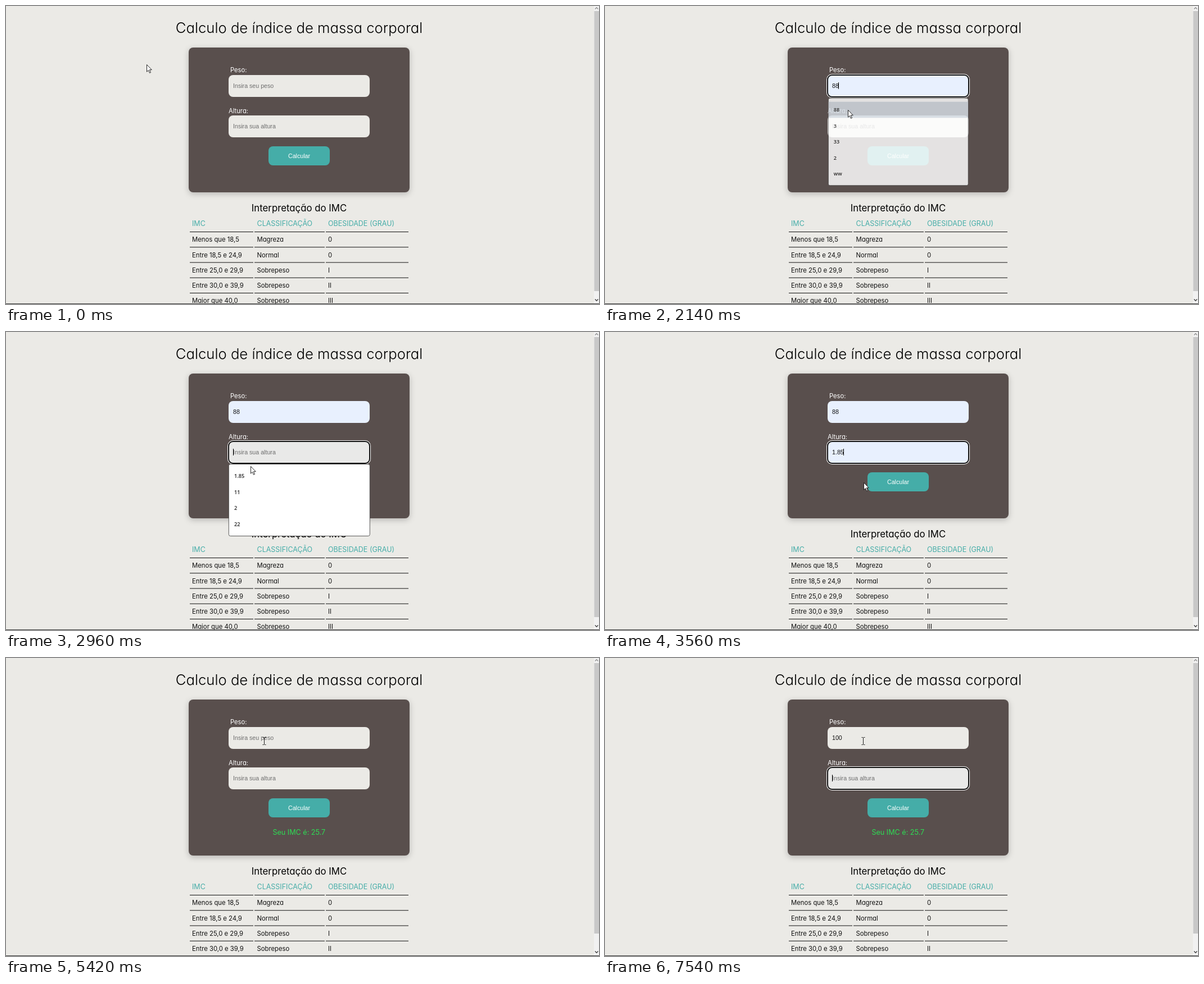
Recreate the animation shown at these times as an HTML page. Size 1055 px wide and 531 px high, loop 8000 ms.

```html
<!DOCTYPE html>
<html lang="pt">
<head>
<meta charset="utf-8">
<title>IMC</title>
<style>
html, body { margin: 0; width: 100%; height: 100%; overflow: hidden; background: #ebeae6; }
svg { display: block; font: 11.3px Inter, sans-serif; font-feature-settings: "cv11"; font-optical-sizing: none; }
.mid { text-anchor: middle; }
.title { font-size: 25.7px; font-weight: 350; }
.head { font-size: 12.5px; fill: #45ada8; }
.label { font-size: 11.2px; fill: #fff; }
.form { font: 10.67px "Liberation Sans", Arial, sans-serif; }
.option { font: 600 9.2px "Open Sans", sans-serif; fill: #222; }
.shadow { filter: drop-shadow(0 3px 5.5px rgba(0, 0, 0, .22)); }
</style>
</head>
<body>
<svg id="stage" width="1055" height="531" viewBox="0 0 1055 531"></svg>
<script>
const NS = 'http://www.w3.org/2000/svg';
const stage = document.getElementById('stage');
const LOOP = 8000, BLINK = 520, RESULT_AT = 4050;

function add(parent, tag, attrs = {}, content = '') {
  const node = document.createElementNS(NS, tag);
  set(node, attrs);
  node.textContent = content;
  return parent.appendChild(node);
}
function set(node, attrs) {
  for (const key in attrs) node.setAttribute(key, attrs[key]);
}
const show = (node, on) => node.setAttribute('visibility', on ? 'visible' : 'hidden');
const rect = (parent, x, y, width, height, fill, rx = 0) =>
  add(parent, 'rect', { x, y, width, height, fill, rx });
const text = (parent, x, y, content, attrs = {}) => add(parent, 'text', { x, y, ...attrs }, content);

rect(stage, 0, 0, 1055, 531, '#ebeae6');
text(stage, 521.5, 47.5, 'Calculo de índice de massa corporal', { class: 'mid title' });

const card = rect(stage, 325, 74, 393, 258, '#594f4d', 8);
card.setAttribute('class', 'shadow');
text(stage, 399, 118.3, 'Peso:', { class: 'label' });
text(stage, 396, 190.5, 'Altura:', { class: 'label' });

function makeField(y, hint) {
  const ring = add(stage, 'g');
  rect(ring, 394, y - 2, 255, 43, '#fff', 10);
  rect(ring, 395, y - 1, 253, 41, '#101010', 9);
  const box = rect(stage, 396, y, 251, 39, '#ebeae6', 8);
  const label = text(stage, 404, y + 23, hint, { class: 'form' });
  const caret = rect(stage, 404, y + 13, 1, 12, '#000');
  return { y, hint, ring, box, label, caret };
}
const weight = makeField(123, 'Insira seu peso');
const height = makeField(195, 'Insira sua altura');

rect(stage, 467, 250, 109, 34, '#45ada8', 8);
text(stage, 521.5, 271, 'Calcular', { class: 'form mid', fill: '#fff' });
const result = text(stage, 521.3, 314.5, 'Seu IMC é: 25.7', { class: 'mid', 'font-size': 12.6, fill: '#2edc54' });

const table = add(stage, 'g');
text(table, 521.5, 366, 'Interpretação do IMC', { class: 'mid', 'font-size': 16.8 });
const columns = [331, 446.5, 573];
['IMC', 'CLASSIFICAÇÃO', 'OBESIDADE (GRAU)'].forEach((s, i) => text(table, columns[i], 392.3, s, { class: 'head' }));
[
  ['Menos que 18,5', 'Magreza', '0'],
  ['Entre 18,5 e 24,9', 'Normal', '0'],
  ['Entre 25,0 e 29,9', 'Sobrepeso', 'I'],
  ['Entre 30,0 e 39,9', 'Sobrepeso', 'II'],
  ['Maior que 40,0', 'Sobrepeso', 'III']
].forEach((row, r) => {
  const y = 402 + r * 27.25;
  [[327, 440], [442, 567], [569, 716]].forEach(([a, b]) => rect(table, a, y, b - a, 1, '#111'));
  row.forEach((s, i) => text(table, columns[i], y + 18.4, s, { fill: '#111' }));
});

function makePanel(y, height, options) {
  const group = add(stage, 'g');
  set(rect(group, 396.3, y + .5, 251, height, '#fff', 3), { stroke: '#333', 'stroke-width': .8 });
  const highlight = rect(group, 396.7, y + 7, 250.2, 29, '#d5dce4');
  options.forEach((s, i) => text(group, 405.9, y + 24.7 + i * 28.8, s, { class: 'option' }));
  return { group, highlight, cy: y + height / 2 };
}
const weightPanel = makePanel(163, 157, ['88', '3', '33', '2', 'ww']);
const heightPanel = makePanel(235, 128, ['1.85', '11', '2', '22']);

// Window edge and scrollbar
rect(stage, 1046, 0, 9, 531, '#f1f1f1');
const thumb = rect(stage, 1046.5, 9, 8.5, 498, '#c8c8c8');
const chevron = { fill: 'none', 'stroke-width': 1.4 };
add(stage, 'path', { d: 'M1048 5.5l2.7-2.7 2.7 2.7', stroke: '#909090', ...chevron });
add(stage, 'path', { d: 'M1048 522.5l2.7 2.7 2.7-2.7', stroke: '#404040', ...chevron });
rect(stage, 0, 530, 1055, 1, '#3a3a3a');

const arrow = add(stage, 'path', {
  d: 'M.5 .5V13.2L3.4 10.5 5.5 15.3 7.5 14.4 5.4 9.7H9.3Z', fill: '#fff', stroke: '#111', 'stroke-width': .9
});
const beam = add(stage, 'path', {
  d: 'M-2.5 -6.5H-.5L.5 -5.8 1.5 -6.5H3.5M.5 -6V6M-2.5 6.5H-.5L.5 5.8 1.5 6.5H3.5', fill: 'none', stroke: '#222'
});

// Pointer path: time, x, y
const path = [
  [780, 250, 104], [960, 290, 100], [1390, 430, 148], [1600, 430, 148], [2000, 432, 185],
  [2350, 432, 186], [2700, 435, 215], [2850, 435, 222], [2960, 435, 239], [3170, 436, 254],
  [3300, 436, 254], [3560, 460, 268], [3900, 500, 272], [4050, 500, 272], [4460, 450, 322],
  [4660, 450, 322], [4950, 381, 255], [5420, 459, 148]
];
const caretResets = [1460, 2110, 2750, 3300, 5490, 6290, 6690, 7540];

const within = (t, a, b) => t >= a && t < b;
const clamp = v => Math.max(0, Math.min(1, v));
const fade = (t, open, close) => clamp((t - open) / 90) * clamp(1 - (t - close) / 160);

function pointerAt(t) {
  const i = path.findIndex(p => p[0] > t);
  if (i === 0) return path[0].slice(1);
  if (i < 0) return path[path.length - 1].slice(1);
  const [t0, x0, y0] = path[i - 1], [t1, x1, y1] = path[i];
  const k = (t - t0) / (t1 - t0);
  return [x0 + (x1 - x0) * k, y0 + (y1 - y0) * k];
}

function weightAt(t) {
  if (t >= 6690) return '100';
  if (t >= 6480) return '10';
  if (t >= 6290) return '1';
  return within(t, 1840, RESULT_AT) ? '88' : '';
}

function drawField(field, value, autofilled, focused, caretOn) {
  const inset = focused ? 1 : 0;
  show(field.ring, focused);
  set(field.box, {
    fill: autofilled ? '#e8f0fe' : focused ? '#e9e9e8' : '#ebeae6',
    x: 396 + inset, y: field.y + inset,
    width: 251 - 2 * inset, height: 39 - 2 * inset, rx: 8 - inset
  });
  field.label.textContent = value || field.hint;
  field.label.setAttribute('fill', value ? '#111' : '#6e6e6e');
  show(field.caret, focused && caretOn);
  field.caret.setAttribute('x', Math.floor(404 + (value ? field.label.getComputedTextLength() : 0)));
}

function drawPanel({ group, highlight, cy }, opacity, hovered) {
  const scale = 1 - .05 * (1 - opacity);
  set(group, { opacity, transform: `translate(521.75 ${cy}) scale(${scale}) translate(-521.75 ${-cy})` });
  show(highlight, hovered);
}

function draw(t) {
  const done = t >= RESULT_AT;
  const preview = within(t, 1840, 2110) || within(t, 3000, 3300);
  const caretOn = !preview && caretResets.some(r => within(t, r, r + BLINK));
  drawField(weight, weightAt(t), within(t, 1840, RESULT_AT),
    within(t, 1460, 2750) || within(t, 5490, 7540), caretOn);
  const picked = within(t, 3000, RESULT_AT);
  drawField(height, picked ? '1.85' : '', picked, within(t, 2750, RESULT_AT) || t >= 7540, caretOn);

  card.setAttribute('height', done ? 278 : 258);
  table.setAttribute('transform', `translate(0 ${done ? 20 : 0})`);
  thumb.setAttribute('height', done ? 482 : 499);
  show(result, done);

  drawPanel(weightPanel, Math.max(fade(t, 1440, 2115), fade(t, 5470, 6287)), within(t, 1840, 2300));
  drawPanel(heightPanel, fade(t, 2750, 3300), t >= 3000);

  const [x, y] = pointerAt(t);
  const overField = within(x, 396, 647) && (within(y, 123, 162) || within(y, 195, 235));
  const transform = `translate(${Math.round(x)} ${Math.round(y)})`;
  set(arrow, { transform });
  set(beam, { transform });
  show(arrow, !overField);
  show(beam, overField);
}

const start = performance.now();
function tick() {
  draw((performance.now() - start) % LOOP);
  requestAnimationFrame(tick);
}
tick();
</script>
</body>
</html>
```
